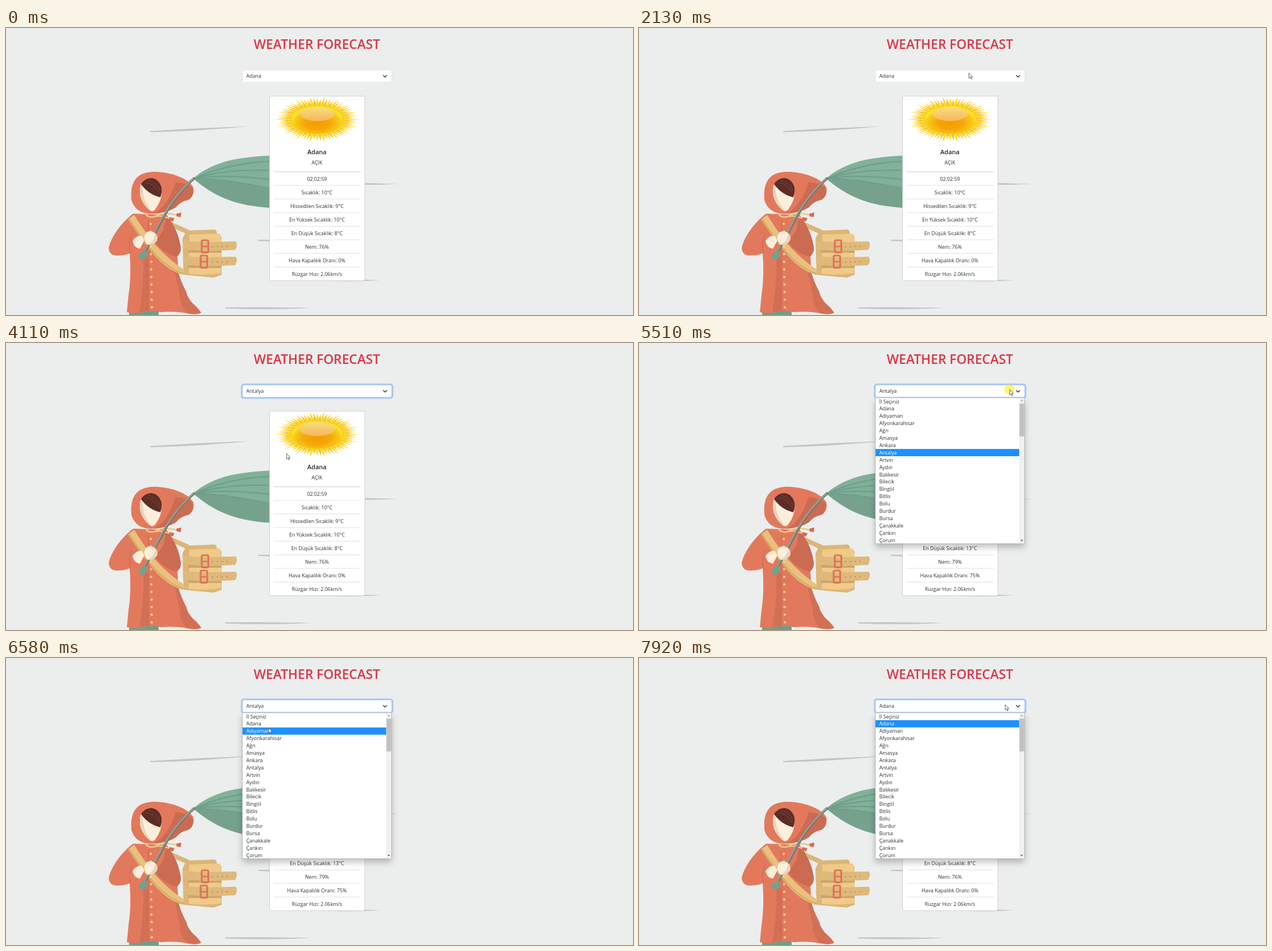
Animation of 1105x507 px, one loop 8000 ms. Source, as an HTML page:

```html
<!DOCTYPE html>
<html lang="tr">
<head>
<meta charset="utf-8">
<title>Weather Forecast</title>
<style>
html, body { margin: 0; width: 100%; height: 100%; overflow: hidden; background: #ebeeed; }
svg { display: block; width: 1105px; height: 507px; }
text { font: 8.9px "Open Sans", "Noto Sans", sans-serif; fill: #2b3035; }
#title { font-size: 22.75px; font-weight: 600; fill: #dc3545; }
#name { font-size: 11px; font-weight: 600; fill: #212529; }
.mid { text-anchor: middle; }
.line { fill: none; stroke-linecap: round; stroke-linejoin: round; }
</style>
</head>
<body>
<svg viewBox="0 0 1105 507">
<defs>
  <radialGradient id="disc" cy=".62">
    <stop offset="0" stop-color="#f59a00"/><stop offset=".5" stop-color="#f5a808"/>
    <stop offset=".85" stop-color="#f8c817"/><stop offset="1" stop-color="#f9e02c"/>
  </radialGradient>
  <linearGradient id="gloss" x2="0" y2="1">
    <stop offset="0" stop-color="#f8df7c"/><stop offset="1" stop-color="#f7b55a"/>
  </linearGradient>
  <linearGradient id="vapor" x2="0" y2="1">
    <stop offset="0" stop-color="#f4f7fa"/><stop offset="1" stop-color="#b9c6d2"/>
  </linearGradient>
  <filter id="shade" x="-15%" y="-15%" width="130%" height="135%">
    <feDropShadow dx="0" dy="6" stdDeviation="6" flood-opacity=".24"/>
  </filter>
</defs>

<g id="wind" fill="#c3c5c4"></g>

<g id="umbrella">
  <path fill="#81b19b" d="M330 266C350 247 383 234 416 230Q440 226 475 225V318C400 315 365 295 330 266"/>
  <path fill="#76a28d" d="M330 266Q395 267 475 288V318C400 315 365 295 330 266"/>
  <g id="ribs" class="line" stroke="#6f9f8a" stroke-width="2.4"></g>
</g>

<g id="pack">
  <path class="line" stroke="#dcb577" stroke-width="8" d="M284 344L320 360"/>
  <path fill="#dcb577" d="M318 358L368 356Q373 359 371 364L380 368V436L366 441L313 436L311 372z"/>
  <path fill="#f0ca88" d="M323 365L377 363L380 373L379 433Q350 438 322 434z"/>
  <g id="belts"></g>
</g>

<g id="girl">
  <path fill="#6f9f8b" d="M217 507V496H269V507z"/>
  <path fill="#e2795d" d="M224 328C203 344 185 369 181 389Q182 401 194 402Q210 402 218 398Q221 440 216 471L213 502Q228 506 246 501Q262 498 272 502Q300 500 318 504Q336 508 344 503Q339 494 326 484Q318 477 318 467Q301 438 303 418L302 403Q309 397 308 388Q303 356 283 330z"/>
  <path fill="#cb6b52" d="M283 331Q304 357 308 388Q308 400 300 404Q276 397 263 378L277 358z"/>
  <path fill="#d27056" d="M241 395Q245 440 235 502L251 500V408zM293 411L303 420Q301 433 318 467Q319 478 344 503Q332 507 318 503Q306 490 306 470z"/>
  <path class="line" stroke="#c6644c" d="M219 398Q215 380 222 366M251 340V500"/>
  <path fill="#e2795d" d="M221 304C219 276 226 253 264 254C295 255 322 267 330 281Q333 294 323 303Q309 305 299 317Q284 326 261 328Q229 330 221 304"/>
  <path fill="#cb6b52" d="M299 272Q330 276 330 288Q330 300 320 304Q308 306 299 317Q285 326 261 328Q286 314 299 272"/>
  <path fill="#fdeedb" d="M237 278Q232 302 250 319Q258 328 264 319Q275 304 274 289Q268 269 255 266Q242 267 237 278"/>
  <path fill="#e7d5bd" d="M237 278Q232 302 250 319L256 322Q240 304 241 280z"/>
  <path fill="#5c2d27" d="M238 276Q243 266 256 265Q270 267 274 282Q275 292 272 299Q252 295 238 276"/>
  <path class="line" stroke="#8b4a3b" stroke-width=".9" d="M246 273Q260 274 270 291M251 269Q264 272 272 287"/>
  <path class="line" stroke="#edc884" stroke-width="2.6" d="M247 330Q255 338 268 330Q281 325 303 331M258 334Q273 329 292 338"/>
  <path fill="#d9694f" d="M300 328L309 326L308 334L301 333zM288 334L297 336L294 342L287 339z"/>
  <path fill="#e9c17d" d="M215 338L226 330Q244 360 265 385Q288 410 314 427L312 436Q286 429 262 402Q233 367 215 338"/>
  <path class="line" stroke="#d3aa6c" stroke-width="2.5" d="M217 338Q237 370 264 401Q288 426 312 434"/>
  <path class="line" stroke="#f5d291" stroke-width="4" stroke-dasharray="0 13.4" d="M255 346L257 494"/>
  <path class="line" stroke="#74786f" stroke-width="4.8" d="M331 266Q300 293 277 335L242 400"/>
  <path class="line" stroke="#9ba096" stroke-width="2.4" d="M330 266Q299 293 276 334L242 398"/>
  <path fill="#6ea48c" d="M244 393L249 397Q249 407 239 410Q233 408 234 401z"/>
  <path fill="#fdeedb" d="M223 376Q230 366 239 367L244 375L236 390Q225 388 223 376M244 368Q246 358 256 359Q267 362 267 372Q262 384 250 383Q243 378 244 368"/>
  <path fill="#e7d5bd" d="M263 363Q269 369 266 376Q259 385 250 382Q261 378 263 363"/>
</g>

<text id="title" class="mid" x="548" y="36.7">WEATHER FORECAST</text>

<g id="card">
  <rect x="464.500" y="120.300" width="168" height="326" rx="2.500" fill="#fff" stroke="#cfd2d2"/>
  <g id="sun">
    <path id="rayBack" fill="#f7bd3c"/>
    <path id="rayFront" fill="#fbdd25"/>
    <ellipse cx="548.500" cy="161.500" rx="46" ry="25" fill="url(#disc)" stroke="#f6b92c"/>
    <ellipse cx="548.500" cy="152" rx="31" ry="12.500" fill="url(#gloss)"/>
  </g>
  <g id="cloud">
    <circle cx="575" cy="148" r="23" fill="#f9c52d"/>
    <path fill="url(#vapor)" d="M498 193Q480 191 481 176Q484 162 500 163Q504 142 525 143Q541 144 547 157Q565 147 578 162Q604 162 606 179Q604 193 589 193z"/>
  </g>
  <text id="name" class="mid" x="548" y="223.200"></text>
</g>

<g id="select">
  <rect id="ring" x="415.300" y="72.800" width="266" height="24.400" rx="4" fill="none" stroke="#abc9f7" stroke-width="2.800"/>
  <rect id="box" x="416.500" y="74" width="263.500" height="22" rx="3" fill="#fff"/>
  <text id="value" x="423.500" y="88.400"></text>
  <path class="line" stroke="#343a40" stroke-width="1.500" d="M665 83.700L668 86.700L671 83.700"/>
</g>

<g id="list">
  <rect x="416.500" y="96.800" width="263" height="257.700" rx="1.500" fill="#fff" stroke="#a9abad" stroke-width=".8" filter="url(#shade)"/>
  <rect x="670" y="97.200" width="9" height="257" fill="#f1f1f1"/>
  <rect x="670.500" y="107" width="8.200" height="58" fill="#c1c1c1"/>
  <path fill="#a3a3a3" d="M672.300 103L674.600 100.500L676.900 103z"/>
  <path fill="#505050" d="M672.300 347.800L674.600 350.300L676.900 347.800z"/>
  <rect id="mark" x="417" width="253" height="12.800" fill="#1e90ff"/>
</g>

<circle id="click" r="9" fill="#ffee00" opacity=".56"/>
<path id="cursor" d="M.4 .4V9.800L2.600 7.800L4.100 11.300L5.500 10.700L4 7.300H6.900z" fill="#fff" stroke="#333" stroke-width=".75" stroke-linejoin="round"/>
</svg>

<script>
const LOOP = 8000, ROW = 12.9, LIST_TOP = 96.9, LAG = 45;
const $ = id => document.getElementById(id);

const cities = ["İl Seçiniz", "Adana", "Adıyaman", "Afyonkarahisar", "Ağrı", "Amasya", "Ankara",
  "Antalya", "Artvin", "Aydın", "Balıkesir", "Bilecik", "Bingöl", "Bitlis", "Bolu", "Burdur",
  "Bursa", "Çanakkale", "Çankırı", "Çorum"];

const weather = {
  Adana: { sky: "AÇIK", time: "02:02:59", temp: 10, feel: 9, max: 10, min: 8, humid: 76, cover: 0 },
  Antalya: { sky: "PARÇALI BULUTLU", time: "02:03:03", temp: 14, feel: 13, max: 14, min: 13, humid: 79, cover: 75 }
};

const smooth = k => (1 - Math.cos(Math.PI * k)) / 2;
const settle = k => 1 - (1 - k) ** 3;

// Each move runs to a point, optionally bent towards `via`
const start = [992, 496];
const moves = [
  { from: 390, until: 1250, to: [532, 173], via: [650, 215] },
  { from: 1330, until: 2130, to: [581, 79], via: [470, 230] },
  { from: 3200, until: 3450, to: [494, 195], ease: settle },
  { from: 4730, until: 5380, to: [653, 82] },
  { from: 5780, until: 6650, to: [461, 119], via: [505, 250] },
  { from: 7200, until: 7520, to: [645, 82] }
];
const clicks = [[2790, 2920], [3920, 4110], [5380, 5640], [6930, 7060], [7790, 7920]];
const opened = [[2850, 4110], [5440, 7060], [7850, LOOP]];

function add(parent, tag, attrs, text = "") {
  const el = document.createElementNS("http://www.w3.org/2000/svg", tag);
  for (const key in attrs) el.setAttribute(key, attrs[key]);
  el.textContent = text;
  return parent.appendChild(el);
}

function streak(x1, y1, x2, y2) {
  const x = (x1 + x2) / 2, y = (y1 + y2) / 2;
  add($("wind"), "path", { d: `M${x1} ${y1 - 1}Q${x} ${y - 2} ${x2} ${y2}Q${x} ${y + 4} ${x1} ${y1 + 1}z` });
}
streak(254, 183, 429, 173.5);
streak(560, 274, 691, 275.5);
streak(444, 375, 540, 376);
streak(560, 445, 660, 445.5);
streak(386, 494.5, 537, 494.5);

for (let i = 0; i < 4; i++) {
  add($("ribs"), "path", { d: `M332 266Q390 ${238 + i * 9.5} 475 ${235 + i * 17}` });
}

function belt(x, y) {
  const g = $("belts");
  add(g, "path", { fill: "#cda46b", d: `M321 ${y + 6}H380V${y + 11}H321z` });
  add(g, "path", { fill: "#dfb97a", d: `M312 ${y - 11}Q340 ${y - 7} 360 ${y - 8}L405 ${y - 9}Q409 ${y - 3} 404 ${y + 6}L360 ${y + 8}Q330 ${y + 8} 312 ${y + 3}z` });
  add(g, "rect", { class: "line", stroke: "#de7459", "stroke-width": 3.2, x: x - 6, y: y - 11, width: 11.5, height: 21.5, rx: 2 });
  add(g, "path", { class: "line", stroke: "#de7459", "stroke-width": 2.5, d: `M${x - 5} ${y}h10` });
  add(g, "path", { class: "line", stroke: "#a4814f", "stroke-width": 2, "stroke-dasharray": "0 8.5", d: `M364 ${y + 0.5}L396 ${y - 0.5}` });
}
belt(351, 386);
belt(349, 413);

// A ring of thin, hollow-sided spikes around the disc
function rays(count, rx, ry, turn) {
  const at = (a, k) => `${(548.5 + rx * k * Math.cos(a)).toFixed(1)} ${(161.5 + ry * k * Math.sin(a)).toFixed(1)}`;
  const step = 2 * Math.PI / count;
  let d = "";
  for (let i = 0; i < count; i++) {
    const a = (i + turn) * step;
    d += `M${at(a - step / 2, 0.58)}Q${at(a - step / 5, 0.75)} ${at(a, 1 - i % 2 * 0.06)}` +
      `Q${at(a + step / 5, 0.75)} ${at(a + step / 2, 0.58)}z`;
  }
  return d;
}
$("rayBack").setAttribute("d", rays(36, 71, 38, 0.5));
$("rayFront").setAttribute("d", rays(36, 76, 40.5, 0));

const sky = add($("card"), "text", { class: "mid", x: 548, y: 241 });
const facts = Array.from({ length: 8 }, (_, i) => {
  const y = 269.8 + i * 24.03;
  add($("card"), "path", { d: `M472 ${y - 15.8}H625`, stroke: i ? "#dedfe0" : "#cccdce" });
  return add($("card"), "text", { class: "mid", x: 548, y });
});
const options = cities.map((city, i) =>
  add($("list"), "text", { x: 423.5, y: 106.5 + i * ROW }, city));

const within = (spans, t) => spans.some(([a, b]) => t >= a && t < b);
const show = (id, on) => { $(id).style.display = on ? "" : "none"; };
const cityIn = (t, a, b) => t >= a && t < b ? "Antalya" : "Adana";

function pointer(t) {
  let p = start;
  for (const { from, until, to, via, ease = smooth } of moves) {
    if (t < from) break;
    const u = ease(Math.min(1, (t - from) / (until - from)));
    p = p.map((v, i) => {
      const c = via ? via[i] : (v + to[i]) / 2;
      return (1 - u) ** 2 * v + 2 * u * (1 - u) * c + u * u * to[i];
    });
  }
  return p;
}

// The row under the pointer, or the chosen city while it is above the list
function markedRow(t, city) {
  const y = pointer(t - LAG)[1];
  return y < LIST_TOP ? cities.indexOf(city) : Math.floor((y - LIST_TOP) / ROW);
}

let shown = "";
function report(city) {
  if (city === shown) return;
  shown = city;
  const w = weather[city];
  $("name").textContent = city;
  sky.textContent = w.sky;
  [w.time, `Sıcaklık: ${w.temp}°C`, `Hissedilen Sıcaklık: ${w.feel}°C`, `En Yüksek Sıcaklık: ${w.max}°C`,
    `En Düşük Sıcaklık: ${w.min}°C`, `Nem: ${w.humid}%`, `Hava Kapalılık Oranı: ${w.cover}%`,
    "Rüzgar Hızı: 2.06km/s"].forEach((line, i) => { facts[i].textContent = line; });
}

function draw(t) {
  const [x, y] = pointer(t);
  const focus = t >= clicks[0][0];
  const city = cityIn(t, opened[0][1], opened[1][1]);
  const row = markedRow(t, city);

  report(cityIn(t, 4310, 7120));
  const cloudy = t >= 4380 && t < 7120;
  show("sun", !cloudy);
  show("cloud", cloudy);

  $("value").textContent = city;
  show("ring", focus);
  $("box").setAttribute("stroke", focus ? "#93bdf8" : "#dde1e4");

  show("list", within(opened, t));
  $("mark").setAttribute("y", LIST_TOP + row * ROW);
  options.forEach((el, i) => { el.style.fill = i === row ? "#fff" : ""; });

  show("cursor", t >= moves[0].from);
  show("click", within(clicks, t));
  for (const id of ["cursor", "click"]) $(id).setAttribute("transform", `translate(${x} ${y})`);
}

function tick() {
  draw(performance.now() % LOOP);
  requestAnimationFrame(tick);
}
tick();
</script>
</body>
</html>
```
